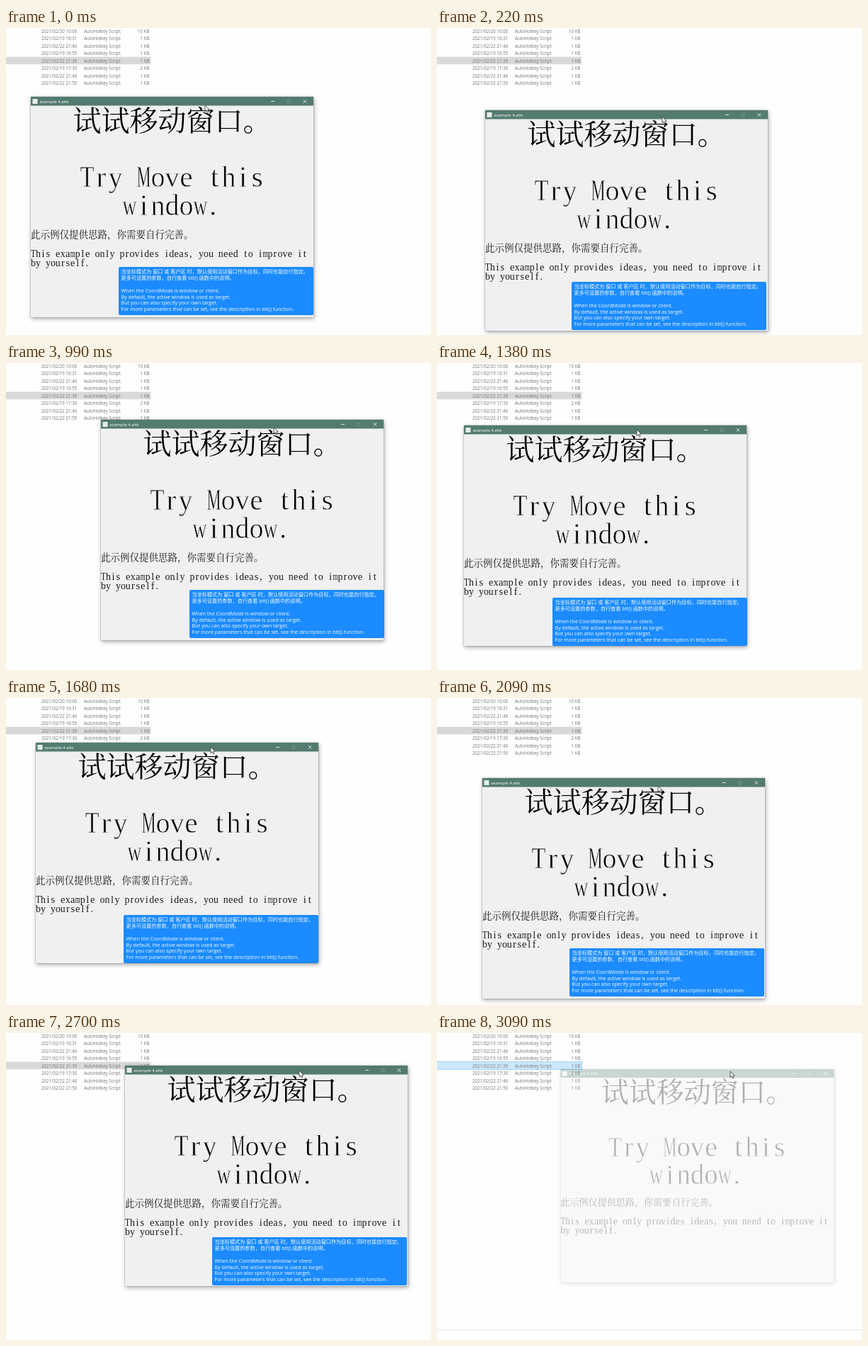
An HTML page for the animation above (3.16 s loop, 600x433 px).

```html
<!DOCTYPE html>
<html lang="zh-CN">
<head>
<meta charset="utf-8">
<title>Move the window</title>
<style>
html, body { margin: 0; width: 100%; height: 100%; overflow: hidden; background: #fefefe; }
#stage { position: relative; width: 600px; height: 433px; overflow: hidden; }
#stage > * { position: absolute; left: 0; top: 0; }
svg { display: block; overflow: visible; }
text { white-space: pre; }
.ui { font-family: "Open Sans", "Noto Sans CJK SC", "Noto Sans", sans-serif; }
.song { font-family: "Noto Serif CJK SC", "Noto Sans CJK SC", "Noto Sans CJK", serif; }
.latin { font-family: "Liberation Serif", serif; }
/* An outline in the window colour thins the strokes of the headline. */
.head { fill: #000; }
.head .song { font-weight: 300; }
.head .latin { stroke: #f0f0f0; stroke-width: .8; }
.body { fill: #1c1c1c; }
#win {
  width: 399px; height: 311px; background: #f0f0f0;
  box-shadow: 0 0 1px rgba(0,0,0,.6), 1px 2px 6px rgba(0,0,0,.36);
}
#tip { width: 275px; height: 68px; background: #1b8bff; border-radius: 2px; }
</style>
</head>
<body>
<div id="stage">
  <svg id="list" class="ui" width="600" height="433" font-size="6.2" fill="#747474">
    <rect id="row" x="-1" y="40.6" width="205.5" height="10.7"/>
    <rect id="status" y="418" width="600" height="1" fill="#e6e6e6"/>
  </svg>
  <div id="win">
    <svg width="399" height="311">
      <rect width="399" height="12.5" fill="#537b70"/>
      <rect x="2.5" y="3" width="7" height="7" fill="#e6edea"/>
      <text class="ui" x="12.5" y="8.6" font-size="6.05" fill="#fff">example 4.ahk</text>
      <g fill="none" stroke="#fff" stroke-width=".8">
        <path d="M339 6.5h5M384.8 4.2l4.6 4.6M389.4 4.2l-4.6 4.6"/>
        <rect x="362" y="4.4" width="4" height="4" stroke="#7f9d95"/>
      </g>
      <g id="head" class="head"></g>
      <g id="body" class="body"></g>
    </svg>
  </div>
  <div id="tip">
    <svg id="note" class="ui" width="275" height="68" font-size="7.15" fill="#f4faff"></svg>
  </div>
  <svg id="cursor" width="8" height="12">
    <path d="M0 0V8.6L2 6.8L3.4 10L5 9.3L3.6 6.2H6.3Z" fill="#fff" stroke="#333" stroke-width=".8"/>
  </svg>
</div>
<script>
const LOOP = 3160, STEP = 77.1, LAST = 40;
const $ = id => document.getElementById(id);
const pen = document.createElement('canvas').getContext('2d');

function put(id, str, attrs) {
  const el = document.createElementNS('http://www.w3.org/2000/svg', 'text');
  for (const k in attrs) el.setAttribute(k, attrs[k]);
  el.textContent = str;
  $(id).appendChild(el);
}

// Full-width characters, one per square cell.
function han(id, str, x, y, size) {
  [...str].forEach((c, i) => put(id, c, { class: 'song', x: x + i * size, y, 'font-size': size }));
}

// Fixed-pitch serif: each letter is centred in its cell, wide letters are condensed.
function mono(id, str, x, y, cell) {
  const size = cell * 2.08;
  pen.font = size + 'px "Liberation Serif", serif';
  [...str].forEach((c, i) => {
    const k = Math.min(1, cell / pen.measureText(c).width);
    const dot = /[.,]/.test(c);
    put(id, c, {
      class: 'latin', 'font-size': size, 'text-anchor': dot ? 'start' : 'middle',
      transform: `translate(${x + (i + (dot ? .12 : .5)) * cell} ${y}) scale(${k} 1)`
    });
  });
}

'20 10:00,19 16:31,22 21:46,19 16:55,22 21:39,19 17:30,22 21:46,22 21:50'
  .split(',').forEach((date, i) => {
    const y = 7 + i * 10.42, size = { 0: 10, 5: 2 }[i] || 1;
    put('list', '2021/02/' + date, { x: 50, y });
    put('list', 'AutoHotkey Script', { x: 110, y });
    put('list', size + ' KB', { x: 202.5, y, 'text-anchor': 'end' });
  });

han('head', '试试移动窗口。', 59.5, 48, 40);
mono('head', 'Try Move this', 69.5, 127, 20);
mono('head', 'window.', 129.5, 167, 20);
han('body', '此示例仅提供思路，你需要自行完善。', 0, 198.6, 13.5);
mono('body', 'This example only provides ideas, you need to improve it', 0, 225.9, 6.97);
mono('body', 'by yourself.', 0, 239.3, 6.97);

`当坐标模式为 窗口 或 客户区 时，默认使用活动窗口作为目标，同时也能自行指定。
更多可设置的参数，自行查看 btt() 函数中的说明。

When the CoordMode is window or client.
By default, the active window is used as target.
But you can also specify your own target.
For more parameters that can be set, see the description in btt() function.`
  .split('\n').forEach((line, i) => put('note', line, { x: 3.5, y: 9.3 + i * 8.82 }));

// Turning points of the drag: step, left, top.
const keys = [
  [-1, 35, 82], [0, 35, 97], [3, 68, 116], [6, 146, 79], [8, 147, 60], [11, 146, 59],
  [13, 134, 80], [15, 84, 113], [18, 38, 88], [22, 43, 60], [23, 43, 60],
  [27, 64, 113], [28, 82, 117], [30, 140, 97], [31, 149, 80], [35, 168, 46]
];

// Smooth curve through the keys that never overshoots them.
const slope = (i, d) => (keys[i + 1][d] - keys[i][d]) / (keys[i + 1][0] - keys[i][0]);
function tangent(i, d) {
  if (i === 0 || i === keys.length - 1) return 0;
  const a = slope(i - 1, d), b = slope(i, d);
  return a * b > 0 ? 2 * a * b / (a + b) : 0;
}
function place(n, d) {
  const end = keys.length - 1;
  if (n >= keys[end][0]) return keys[end][d];
  const i = keys.findIndex(k => k[0] > n) - 1;
  const span = keys[i + 1][0] - keys[i][0], u = (n - keys[i][0]) / span, v = 1 - u;
  return keys[i][d] * v * v * (1 + 2 * u) + keys[i + 1][d] * u * u * (3 - 2 * u)
    + span * u * v * (tangent(i, d) * v - tangent(i + 1, d) * u);
}

const move = (id, x, y, more = '') =>
  $(id).style.transform = `translate(${Math.round(x)}px,${Math.round(y)}px)${more}`;

function draw(t) {
  const n = Math.min(LAST, Math.floor((t + 13) / STEP));
  const x = place(n, 1), y = place(n, 2);
  const dx = x - place(n - 1, 1), dy = y - place(n - 1, 2);
  const shut = Math.max(0, n - 38) / 2, gone = shut ** 1.5, closing = shut > 0;

  move('win', x, y, ` scale(${1 - gone * .032})`);
  $('win').style.opacity = 1 - gone * .7;
  // The tip trails the window a little, the pointer leads it.
  move('tip', x + 123.6 - dx * .13, y + 242 - dy * .13);
  move('cursor', x + 246 + dx * .25, y + 8 + dy * .25);

  $('tip').style.display = closing ? 'none' : '';
  $('status').style.display = closing ? '' : 'none';
  $('row').setAttribute('fill', closing ? '#cce8ff' : '#d9d9d9');
  $('row').setAttribute('stroke', closing ? '#99d1ff' : 'none');
}

const t0 = performance.now();
function tick() {
  draw((performance.now() - t0) % LOOP);
  requestAnimationFrame(tick);
}
tick();
</script>
</body>
</html>
```
